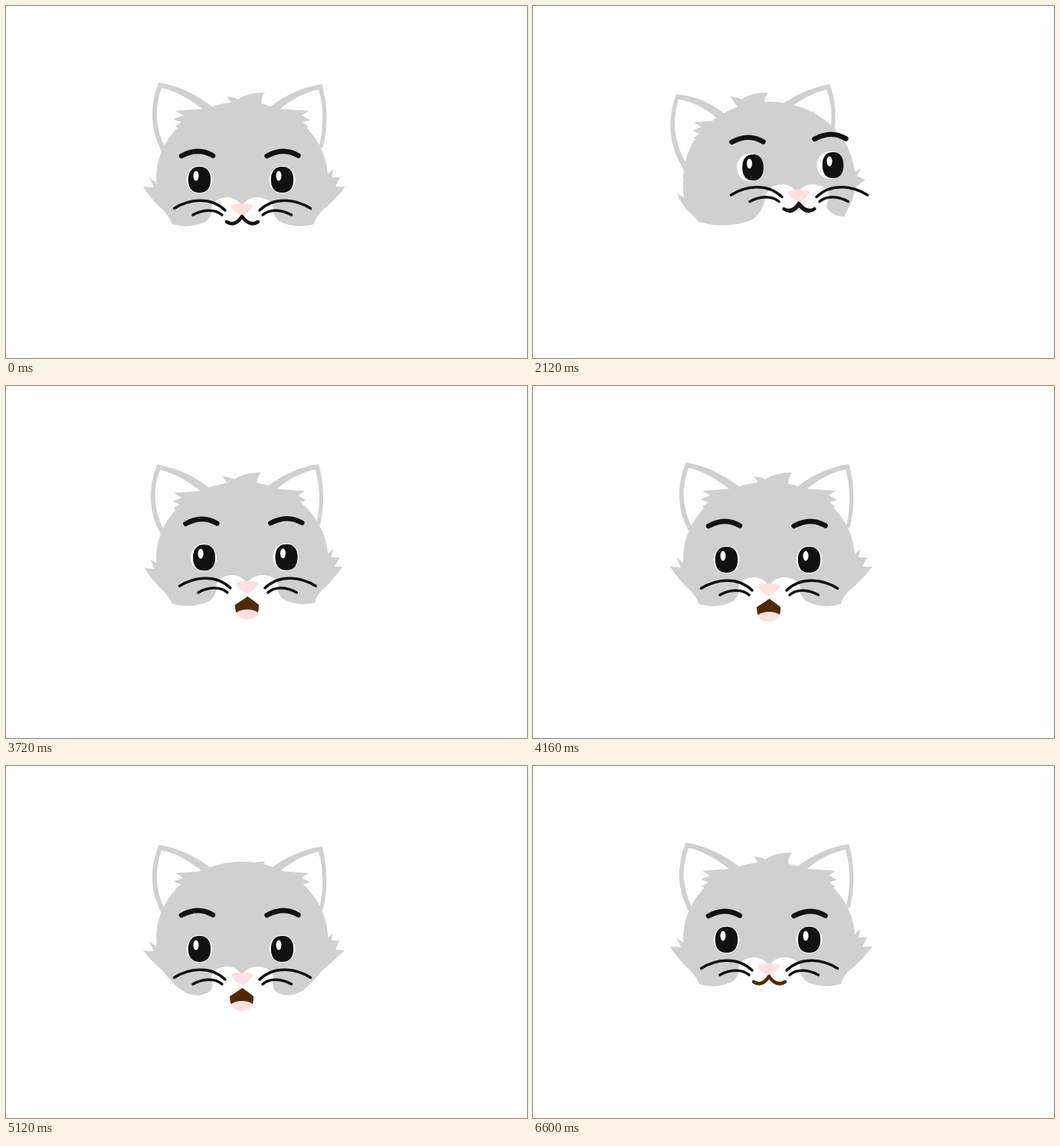
These frames come from a looping animation (680x460 px, 6.64 s). An HTML page with a canvas:

```html
<!DOCTYPE html>
<html>
<head>
<meta charset="utf-8">
<title>Cat</title>
<style>
html, body { margin: 0; width: 100%; height: 100%; overflow: hidden; background: #fff; }
canvas { display: block; }
</style>
</head>
<body>
<canvas id="stage" width="680" height="460"></canvas>
<script>
const ctx = document.getElementById('stage').getContext('2d');
const LOOP = 6640;
const FUR = '#d0d0d0', INK = '#111', PINK = '#ffe0de', BROWN = [82, 41, 4];

const progress = (t, start, end) => Math.min(1, Math.max(0, (t - start) / (end - start)));
const easeInOut = x => x < .5 ? 2 * x * x : 1 - 2 * (1 - x) ** 2;
const easeOut = x => 1 - (1 - x) ** 2;

let turn = 0, nod = 0, open = 0, browning = 0;

const numbers = d => d.match(/-?[\d.]+/g).map(Number);

// Blend paths that share the same commands; each target has its own weight.
function blend(rest, ...targets) {
  const lists = targets.map(([path, weight]) => [numbers(path), weight]);
  let i = 0;
  return new Path2D(rest.replace(/-?[\d.]+/g, s => {
    const value = lists.reduce((sum, [list, weight]) => sum + (list[i] - s) * weight, +s);
    i++;
    return value.toFixed(3);
  }));
}
const pose = (rest, turned, nodded = rest) => blend(rest, [turned, turn], [nodded, nod]);

// Draw at an offset that follows the head pose.
function follow(turnX, turnY, nodY, draw) {
  ctx.save();
  ctx.translate(turnX * turn, turnY * turn + nodY * nod);
  draw();
  ctx.restore();
}

function fill(path, color) {
  ctx.fillStyle = color;
  ctx.fill(typeof path === 'string' ? new Path2D(path) : path, 'evenodd');
}

function stroke(path, color, width) {
  ctx.strokeStyle = color;
  ctx.lineWidth = width;
  ctx.stroke(typeof path === 'string' ? new Path2D(path) : path);
}

function ellipse(x, y, rx, ry, color) {
  ctx.beginPath();
  ctx.ellipse(x, y, rx, ry, 0, 0, 2 * Math.PI);
  ctx.fillStyle = color;
  ctx.fill();
}

function drawEar(outer, inner) {
  follow(0, 0, 3, () => {
    fill(outer, FUR);
    stroke(outer, FUR, 5);
    fill(inner, '#fff');
  });
}

function drawEars() {
  ctx.lineCap = 'butt';
  ctx.lineJoin = 'miter';
  drawEar(
    pose('M205 188 Q184 148 201 103 Q236 109 268 134',
         'M199 213 Q171 168 188.500 118 Q222 121 250 144'),
    pose('M207 184 Q188.500 146 203 107 Q230 113 259 137',
         'M201 208 Q176 166 190 122 Q216 126 242 148'));
  drawEar(
    pose('M347 133 Q378 110 410.500 105 Q421 145 411 185',
         'M328 129 Q356 111 385.500 105 Q395 130 391 162'),
    pose('M356 136 Q380 115 408 109 Q418 145 409 182',
         'M338 131 Q360 115 383.500 109 Q391.500 130 389 159'));
  follow(-11, 15, 3, () =>
    fill('M262 134 L221 137 L231 143 L219 148 L229 152 L221 157 L228 164 L262 162Z', FUR));
  follow(-27, 1, 3, () =>
    fill('M354 134 L395 137 L386 143 L397 149 L387 152 L394 157 L388 164 L354 162Z', FUR));
}

function drawHead() {
  follow(-31, 0, 12, () =>
    fill('M306 145 L296 129 L288 118 Q298 119 303 122 Q316 113 338 113 Q333 119 333 128 L330 145Z', FUR));
  drawEars();
  const bottom = 262 - 17 * turn + 10 * nod;
  fill(`M196 225 A112 100 0 0 1 420 225 L386 ${bottom} H230Z`, FUR);
  fill(pose(
    'M197 218 L196 231 L187 224 L193 237 L179 236 Q187 250 205 267 Q213 275 217 285 Q240 292 262 281 Q272 270 268 258 L250 225Z',
    'M197 218 L196 232 L196 240 L197 250 L188 245 Q194 261 205 270 Q211 276 216 282 Q250 292 285 280 Q303 268 304 243 L250 225Z',
    'M197 220 L196 236 L187 229 L193 242 L179 241 Q187 252 205 268 Q218 285 229 293 Q249 306 267 294 Q273 282 268 268 L250 225Z'), FUR);
  fill(pose(
    'M419 212 L420 220 L427 213 L425 224 L436 224 L430 236 L443 236 Q429 254 412 268 Q404 276 402 285 Q378 292 356 281 Q345 270 349 258 L370 225Z',
    'M419 212 L420 217 L428 212 L423 222 L434 227 L423 235 L421 237 Q418 252 413 262 Q408 270 407 275 Q394 276 385 266 Q379 258 381 243 L380 225Z',
    'M419 214 L420 225 L426 219 L425 228 L435 228 L430 240 L442 241 Q428 254 412 268 Q398 285 388 293 Q369 306 351 294 Q345 282 349 268 L370 225Z'), FUR);
}

function drawEye(x, shift, lift) {
  follow(shift, lift, 12, () => ellipse(x, 227, 17, 18, '#fff'));
  follow(shift + 4, lift, 12, () => {
    ctx.translate(x, 227);
    ctx.save();
    ctx.scale(1 - .06 * turn, 1);
    fill('M0 -17 C9.500 -17 14.700 -11 14.700 0 C14.700 11 9.500 17 0 17 C-9.500 17 -14.700 11 -14.700 0 C-14.700 -11 -9.500 -17 0 -17Z', INK);
    ctx.restore();
    ellipse(-4.5, -5, 3.5, 6.5, '#fff');
  });
}

function drawBrow(x, shift, lift) {
  follow(shift, lift, 12, () => {
    ctx.translate(x, -13 * open);
    stroke('M-20.500 196 Q1 184 20.500 195.500', INK, 6.5);
  });
}

function drawMouth() {
  const mouth = blend(
    'M288 282 Q299 289 308 275 Q318 289 329 282 Q318 289 308 275 Q299 289 288 282Z',
    ['M292 289 Q300 284 308.500 278 Q317 284 323 289 Q324 308 308 308 Q292 308 292 289Z', open]);
  const lips = BROWN.map(c => Math.round(17 + (c - 17) * browning));
  fill(mouth, PINK);
  ctx.save();
  ctx.clip(mouth);
  // The dark throat leaves a rounded hole where the tongue shows.
  fill('M270 250 H346 V330 H270Z M288 309 a20 14 0 1 0 40 0 a20 14 0 1 0 -40 0Z', `rgb(${BROWN})`);
  ctx.restore();
  if (open < 1) stroke(mouth, `rgb(${lips})`, 4.5 * (1 - open));
}

function drawMuzzle() {
  follow(37, -17, 12, () =>
    fill('M308 262 Q302 250 288 250 Q268 252 268 266 Q270 276 278 310 H339 Q347 276 349 266 Q349 252 329 250 Q314 250 308 262Z', '#fff'));
  follow(39, -17.5, 12, () => {
    fill('M297 259 Q308 257 319 259 Q324 260 321 264 Q316 270 311 273 Q308 275 305 273 Q299 270 295 264 Q292 260 297 259Z', PINK);
    stroke('M219.500 264.500 C238 253 266 248 286 267 M244 273 C256 266 272 264.500 282 273', INK, 3.5);
    stroke('M331 267 C351 248 379 253 397.500 264.500 M335 273 C345 264.500 360 266 372.500 273', INK, 3.5);
    drawMouth();
  });
}

function draw(t) {
  turn = easeInOut(progress(t, 1060, 1940)) - easeInOut(progress(t, 2660, 4170));
  nod = easeInOut(progress(t, 4160, 4660)) - easeInOut(progress(t, 5400, 6020));
  browning = easeOut(progress(t, 2105, 2480));
  open = browning - easeOut(progress(t, 5910, 6290));

  ctx.fillStyle = '#fff';
  ctx.fillRect(0, 0, 680, 460);
  drawHead();
  ctx.lineCap = ctx.lineJoin = 'round';
  drawEye(252.5, 30.5, -16);
  drawEye(360.5, 27, -19);
  drawBrow(249.5, 30.5, -17);
  drawBrow(361, 27, -21);
  drawMuzzle();
}

const start = performance.now();
function frame() {
  draw((performance.now() - start) % LOOP);
  requestAnimationFrame(frame);
}
frame();
</script>
</body>
</html>
```
